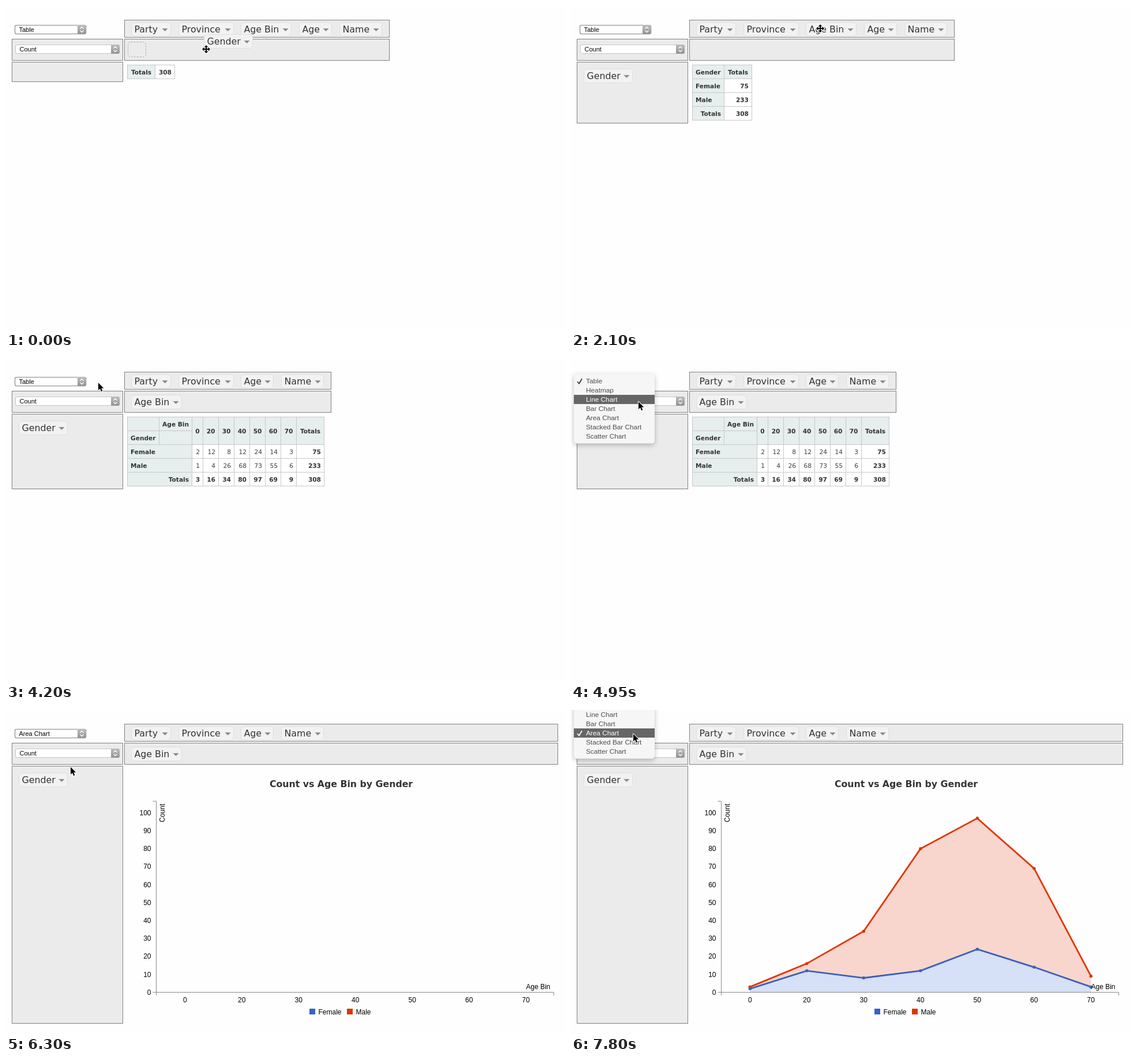
Write an HTML page that moves like this. It is 969 px wide and 563 px high and loops after 8000 ms.

```html
<!DOCTYPE html>
<html lang="en">
<head>
<meta charset="utf-8">
<title>Pivot table</title>
<style>
html, body { margin: 0; width: 100%; height: 100%; overflow: hidden; background: #fefefe; }
svg { display: block; width: 969px; height: 563px; }
text { font-family: "Liberation Sans", Arial, sans-serif; font-size: 12px; white-space: pre; }
.pill, .cell, .bold, .title { font-family: "DejaVu Sans", Verdana, sans-serif; fill: #333; }
.pill { font-size: 15.8px; }
.cell { font-size: 10.6px; fill: #3d3d3d; }
.bold { font-size: 10.6px; font-weight: bold; }
.title { font-size: 15.75px; font-weight: bold; }
.select { font-size: 11px; }
.item { font-size: 11.8px; fill: #4c4c4c; }
.chosen { fill: #fff; }
.panel { fill: #ebebeb; stroke: #808080; }
.slot { fill: none; stroke: #aaa; stroke-dasharray: 3 2; }
.axis { fill: none; stroke: #888; }
#menu { filter: drop-shadow(0 3px 4px rgba(0, 0, 0, .25)); }
.cursor { stroke: #fff; stroke-width: 2; stroke-linejoin: round; paint-order: stroke; }
</style>
</head>
<body>
<svg id="stage" viewBox="0 0 969 563" xmlns="http://www.w3.org/2000/svg"></svg>
<script>
const LOOP = 8000, STEP = 150;
const BLUE = '#3561ca', RED = '#df3500';

const text = (x, y, s, cls = '', anchor = 'start') =>
  `<text x="${x}" y="${y}" class="${cls}" text-anchor="${anchor}">${s}</text>`;
const box = (x0, y0, x1, y1, attrs) =>
  `<rect x="${x0 + .5}" y="${y0 + .5}" width="${x1 - x0}" height="${y1 - y0}" ${attrs}/>`;
const during = (from, to, content) =>
  `<g data-from="${from}" data-to="${to}">${content}</g>`;

// Attribute pills and drop slots
const widths = { Party: 69, Province: 96, 'Age Bin': 88, Age: 57, Name: 74, Gender: 85 };
function pill(name, x, y) {
  const w = widths[name];
  return box(x, y, x + w - 1, y + 24, 'rx="5" fill="#f2f2f2" stroke="#dedede"') +
    text(x + 5.5, y + 18, name, 'pill') +
    `<path d="M${x + w - 15.5} ${y + 11}h10l-5 5z" fill="#8a8a8a"/>`;
}
const pills = (y, places) => places.map(([name, x]) => pill(name, x, y)).join('');
const slot = (x, y, h) => box(x, y, x + 31, y + h, 'rx="5" class="slot"');

const panels = right =>
  box(205, 24, right, 54, 'class="panel"') + box(205, 57, right, 94, 'class="panel"');
const rowPanel = bottom => box(10, 97, 202, bottom, 'class="panel"');

function select(x, y, w, stroke, width) {
  const right = x + w, mid = right - 7.5;
  return `<rect x="${x + .5}" y="${y + .5}" width="${w - 1}" height="15" rx="2.5" fill="#fff" stroke="${stroke}" stroke-width="${width}"/>
    <path d="M${right - 15} ${y}h12q3 0 3 3v10q0 3 -3 3h-12z" fill="url(#knob)"/>
    <path d="M${mid - 3} ${y + 6.5}l3 -3 3 3M${mid - 3} ${y + 9.5}l3 3 3 -3" fill="none" stroke="#fff" stroke-width="1.3"/>`;
}

// Pivot tables
function cell(x0, y0, x1, y1, s, { head = false, bold = true, align = 'end' } = {}) {
  const x = { start: x0 + 6, middle: (x0 + x1 + 1) / 2, end: x1 - 5 }[align];
  return box(x0, y0, x1, y1, `fill="${head ? '#e6eeee' : '#fff'}" stroke="#c8c8c8"`) +
    text(x, (y0 + y1) / 2 + 5, s, bold ? 'bold' : 'cell', align);
}
const label = (x0, y0, x1, y1, s, align = 'start') => cell(x0, y0, x1, y1, s, { head: true, align });

const totalOnly = label(210, 102, 258, 126, 'Totals', 'middle') + cell(258, 102, 292, 126, 308);

const byGender = label(210, 102, 265, 126, 'Gender') + label(265, 102, 313, 126, 'Totals', 'middle') +
  [['Female', 75], ['Male', 233], ['Totals', 308]].map(([name, n], i) => {
    const y = 126 + 24 * i;
    return label(210, y, 265, y + 24, name, i == 2 ? 'end' : 'start') + cell(265, y, 313, y + 24, n);
  }).join('');

const ages = [0, 20, 30, 40, 50, 60, 70];
const female = [2, 12, 8, 12, 24, 14, 3];
const male = [1, 4, 26, 68, 73, 55, 6];
const both = female.map((n, i) => n + male[i]);
const colX = i => i == 0 ? 322 : i == 8 ? 551 : 341 + 27 * (i - 1);

function byAge() {
  let out = label(210, 102, 265, 126, '') + label(265, 102, 322, 126, 'Age Bin', 'end') +
    label(210, 126, 265, 150, 'Gender') + label(265, 126, 322, 150, '');
  [...ages, 'Totals'].forEach((s, i) => out += label(colX(i), 102, colX(i + 1), 150, s, 'middle'));
  [['Female', female, 75], ['Male', male, 233], ['Totals', both, 308]].forEach(([name, data, sum], r) => {
    const y = 150 + 24 * r;
    out += label(210, y, 322, y + 24, name, r == 2 ? 'end' : 'start');
    [...data, sum].forEach((n, i) =>
      out += cell(colX(i), y, colX(i + 1), y + 24, n, { bold: r == 2 || i == 7 }));
  });
  return out;
}

// Area chart
const px = i => 310.3 + 98.5 * i, py = v => 490.5 - 3.118 * v;
const points = data => data.map((v, i) => `${px(i)},${py(v).toFixed(1)}`);
const area = (top, base, fill) =>
  `<polygon points="${[...points(top), ...points(base).reverse()].join(' ')}" fill="${fill}"/>`;
const line = (data, color) =>
  `<polyline points="${points(data).join(' ')}" fill="none" stroke="${color}" stroke-width="2.8"/>` +
  data.map((v, i) => `<circle cx="${px(i)}" cy="${py(v)}" r="2.7" fill="${color}"/>`).join('');

function chart() {
  const zero = ages.map(() => 0);
  let out = text(581, 134, 'Count vs Age Bin by Gender', 'title', 'middle') +
    `<g id="series">${area(both, female, '#f8d6ce')}${area(female, zero, '#d6e0f7')}${line(both, RED)}${line(female, '#3c5fc0')}</g>` +
    '<path class="axis" d="M254.500 158.500h6v332h-6M260.500 496v-5.500h689v5.500"/>';
  for (let v = 0; v <= 100; v += 10) out += text(251.5, py(v) + 4.2, v, '', 'end');
  ages.forEach((a, i) => out += text(px(i), 508, a, '', 'middle'));
  return out + '<text transform="translate(275 163) rotate(-90)" text-anchor="end">Count</text>' +
    text(943.5, 485, 'Age Bin', '', 'end') +
    `<rect x="526" y="519" width="10" height="10" fill="${BLUE}"/>` + text(541.5, 529, 'Female') +
    `<rect x="591" y="519" width="10" height="10" fill="${RED}"/>` + text(606.5, 529, 'Male');
}

// Chart type menu
const items = ['Table', 'Heatmap', 'Line Chart', 'Bar Chart', 'Area Chart', 'Stacked Bar Chart', 'Scatter Chart'];
const menu = '<rect x="5" y="27" width="140" height="121.500" rx="5" fill="#f6f6f6"/>' +
  '<rect id="bar" x="5" width="140" height="16" fill="#666"/>' +
  items.map((s, i) => text(26, 44.3 + 16 * i, s, 'item')).join('') +
  '<path id="tick" d="M11 41l3 3.500 5 -8.500" fill="none" stroke-width="1.700"/>';

const stage = document.getElementById('stage');
stage.innerHTML = `
  <defs><linearGradient id="knob" x2="0" y2="1"><stop stop-color="#bdbdbd"/><stop offset="1" stop-color="#929292"/></linearGradient></defs>
  ${during(0, 2250, panels(664))}${during(2250, 2550, panels(595))}
  ${during(2550, 6300, panels(563))}${during(6300, LOOP, panels(956))}
  ${box(10, 57, 202, 94, 'class="panel"')}
  ${during(0, 1050, rowPanel(131))}${during(1050, 3000, rowPanel(203))}
  ${during(3000, 6300, rowPanel(227))}${during(6300, LOOP, rowPanel(544))}
  ${select(15, 33, 124, '#a2a2a2', 1.6)}${select(16, 67, 181, '#c6c6c6', 1)}
  ${during(0, 6300, text(22.5, 45, 'Table', 'select'))}
  ${during(6300, LOOP, text(22.5, 45, 'Area Chart', 'select'))}
  ${text(23.5, 79, 'Count', 'select')}
  ${pills(28, [['Party', 217], ['Province', 299]])}
  ${during(0, 2250, pills(28, [['Age Bin', 407], ['Age', 508], ['Name', 578]]))}
  ${during(2250, 2550, slot(401, 27, 25) + pills(28, [['Age', 439], ['Name', 509]]))}
  ${during(2550, LOOP, pills(28, [['Age', 407], ['Name', 477]]))}
  ${during(0, 450, slot(211, 62, 26))}${during(450, 1050, slot(16, 103, 21))}
  ${during(2550, 3000, slot(211, 62, 26))}
  ${during(1050, LOOP, pill('Gender', 22, 109))}
  ${during(3000, LOOP, pill('Age Bin', 217, 64))}
  ${during(0, 1050, totalOnly)}${during(1050, 3000, byGender)}
  ${during(3000, 6300, byAge())}${during(6300, LOOP, chart())}
  ${during(0, 1050, `<g id="gender">${pill('Gender', 0, 0)}</g>`)}
  ${during(2250, 3000, `<g id="ageBin">${pill('Age Bin', 0, 0)}</g>`)}
  <g id="menu">${menu}</g>
  <path id="arrow" class="cursor" d="M0 0V13L3 10.300 5.200 15.200 7.300 14.300 5.200 9.600H9.300Z"/>
  <path id="cross" class="cursor" d="M-7 0L-3.500 -3.500V-1H-1V-3.500H-3.500L0 -7 3.500 -3.500H1V-1H3.500V-3.500L7 0 3.500 3.500V1H1V3.500H3.500L0 7 -3.500 3.500H-1V1H-3.500V3.500Z"/>`;

const $ = id => document.getElementById(id);
const timed = [...stage.querySelectorAll('[data-from]')];
const itemTexts = [...stage.querySelectorAll('.item')];

// Waypoints: time, x, y
const pointer = [
  [0, 347, 75], [150, 290, 88], [300, 235, 98], [450, 195, 104], [600, 178, 106], [750, 173, 107],
  [1350, 173, 107], [1500, 200, 100], [1800, 345, 60], [1950, 405, 46], [2100, 432, 39],
  [2250, 431, 43], [2400, 429, 50], [2700, 421, 67], [3600, 421, 67],
  [3750, 400, 64], [4050, 235, 52], [4200, 160, 43], [4350, 126, 39], [4500, 120, 38],
  [4650, 120, 38], [4800, 119, 56], [4950, 117, 76], [5100, 114, 84], [5400, 112, 99],
  [6750, 112, 99], [6900, 111, 92], [7200, 109, 62], [7350, 108, 49], [7500, 108, 41.5]];
const genderDrag = [[0, 343, 49], [150, 305, 62], [300, 240, 78], [450, 185, 90], [600, 155, 96], [750, 143, 98]];

function along(path, t) {
  const next = path.findIndex(p => p[0] > t);
  if (next < 0) return path[path.length - 1].slice(1);
  const [t0, x0, y0] = path[next - 1], [t1, x1, y1] = path[next];
  const k = (t - t0) / (t1 - t0);
  return [x0 + (x1 - x0) * k, y0 + (y1 - y0) * k];
}
const move = (id, x, y) => $(id).setAttribute('transform', `translate(${x} ${y})`);
const show = (el, on) => el.style.display = on ? '' : 'none';

function drawMenu(t, y) {
  const second = t >= 7800;
  show($('menu'), second || t >= 4500 && t < 6150);
  const checked = second ? 4 : 0;
  const active = second ? 4 : Math.max(0, Math.min(6, Math.floor((y - 32) / 16)));
  move('menu', 0, second ? -64 : 0);
  $('menu').style.opacity = t == 6000 ? .5 : 1;
  $('bar').setAttribute('y', 32 + 16 * active);
  move('tick', 0, 16 * checked);
  $('tick').setAttribute('stroke', active == checked ? '#fff' : '#333');
  itemTexts.forEach((el, i) => el.classList.toggle('chosen', i == active));
}

function draw(now) {
  const t = Math.floor((now % LOOP) / STEP) * STEP;
  timed.forEach(el => show(el, t >= +el.dataset.from && t < +el.dataset.to));
  const [x, y] = along(pointer, t);
  const dragging = t < 1050 || t >= 1950 && t < 3000;
  show($('cross'), dragging);
  show($('arrow'), !dragging);
  move(dragging ? 'cross' : 'arrow', x, y);
  move('gender', ...along(genderDrag, t));
  move('ageBin', x - 25, y - 10);
  drawMenu(t, y);
  $('series').style.opacity = Math.max(0, Math.min(1, (t - 6300) / 300));
}

const start = performance.now();
function tick() {
  draw(performance.now() - start);
  requestAnimationFrame(tick);
}
tick();
</script>
</body>
</html>
```
